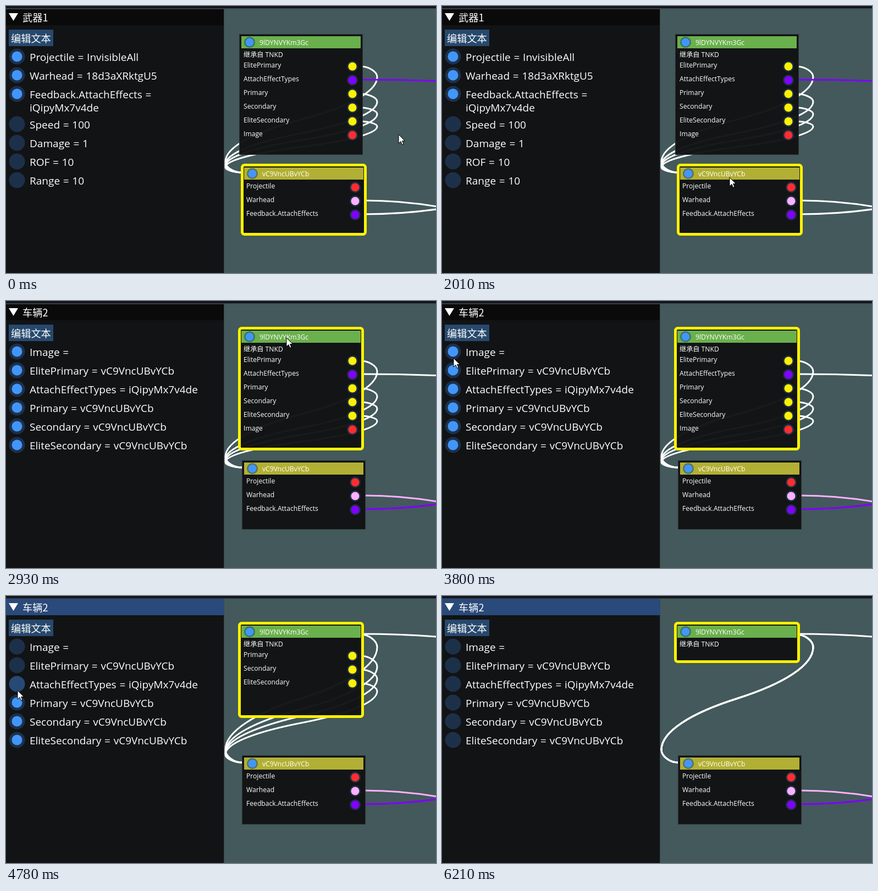
An HTML page with a canvas that plays this animation: 782 by 486 pixels, repeating every 8.86 s.

```html
<!DOCTYPE html>
<html lang="zh">
<head>
<meta charset="utf-8">
<style>
html, body { margin: 0; width: 100%; height: 100%; overflow: hidden; background: #43595b; }
canvas { display: block; }
</style>
</head>
<body>
<canvas id="stage" width="782" height="486"></canvas>
<script>
const ctx = document.getElementById('stage').getContext('2d');
const LOOP = 8860;
const LATIN = '"Open Sans", "Noto Sans CJK SC", "Noto Sans CJK", sans-serif';
const CJK = '"Noto Sans CJK SC", "Noto Sans CJK", "Open Sans", sans-serif';
const SMALL = '12.15px ' + LATIN, LARGE = '19px ' + LATIN, TITLE = '18.2px ' + CJK;
const YELLOW = '#fff200', PURPLE = '#8000ff', RED = '#ff2d2d', PINK = '#ffb0ff', BLUE = '#4296fa';

const VEHICLE = 'vC9VncUBvYCb', EFFECT = 'iQipyMx7v4de';
const VEHICLE_PINS = {
  ElitePrimary: YELLOW, AttachEffectTypes: PURPLE, Primary: YELLOW,
  Secondary: YELLOW, EliteSecondary: YELLOW, Image: RED
};
const WEAPON_PINS = { Projectile: RED, Warhead: PINK, 'Feedback.AttachEffects': PURPLE };
const VEHICLE_ROWS = {
  Image: '', ElitePrimary: VEHICLE, AttachEffectTypes: EFFECT,
  Primary: VEHICLE, Secondary: VEHICLE, EliteSecondary: VEHICLE
};
const WEAPON_ROWS = {
  Projectile: 'InvisibleAll', Warhead: '18d3aXRktgU5', 'Feedback.AttachEffects': '\n' + EFFECT,
  Speed: '100', Damage: '1', ROF: '10', Range: '10'
};

// The vehicle's panel rows are switched off one after another.
const VEHICLE_KEYS = Object.keys(VEHICLE_ROWS);
const ROW_STEP = 34, RESIZE_LAG = 60;
const clickAt = i => 3990 + 380 * i;
const offAt = key => clickAt(VEHICLE_KEYS.indexOf(key));

const move = (from, to, x, y, bend = 0) => ({ from, to, x, y, bend });
const MOVES = [
  move(250, 770, 548, 64),
  move(1290, 1740, 523, 312, -40),
  move(2070, 2630, 510, 67),
  move(2990, 3680, 21, 104),
  ...VEHICLE_KEYS.slice(1).map((_, i) =>
    move(clickAt(i) + 100, clickAt(i) + 230, 21, 104 + ROW_STEP * (i + 1))),
  move(5990, 6190, 345, 450)
];

function pointerAt(t) {
  let x = 714, y = 234;
  for (const m of MOVES) {
    const u = Math.min(1, Math.max(0, (t - m.from) / (m.to - m.from)));
    const eased = u * u * (3 - 2 * u);
    x += (m.x - x) * eased + m.bend * Math.sin(Math.PI * u);
    y += (m.y - y) * eased;
  }
  return [x, y];
}

function rect(x, y, w, h, color) {
  ctx.fillStyle = color;
  ctx.fillRect(x, y, w, h);
}

function dot(x, y, r, color) {
  ctx.fillStyle = color;
  ctx.beginPath();
  ctx.arc(x, y, r, 0, Math.PI * 2);
  ctx.fill();
}

function text(str, x, y, font) {
  ctx.font = font;
  ctx.wordSpacing = font === LARGE ? '0.8px' : '0px';
  ctx.fillStyle = '#fff';
  ctx.fillText(str, x, y);
}

// Chained cubic curves through a flat list of [x, y] points.
function wire(color, points) {
  ctx.strokeStyle = color;
  ctx.lineWidth = 3;
  ctx.beginPath();
  ctx.moveTo(...points[0]);
  for (let i = 1; i < points.length; i += 3) ctx.bezierCurveTo(...points.slice(i, i + 3).flat());
  ctx.stroke();
}

// Half of the S from the vehicle's right side; the other half is its mirror.
const HALF = [[645, 0], [660, 0], [675, .05], [675, .1], [675, .24], [622, .385], [537, .5]];
const LOOP_SHAPE = [...HALF, ...HALF.slice(0, -1).reverse().map(([x, f]) => [1074 - x, 1 - f])];

function loopWire(y) {
  wire('#fff', LOOP_SHAPE.map(([x, f]) => [x, y + f * (303 - y)]));
}

function exitWire(color, x, y, drop) {
  const w = 783 - x;
  wire(color, [[x, y], [x + w * .4, y], [x + w * .73, y + drop * .45], [783, y + drop]]);
}

function node(x, y, h, title, color, selected) {
  rect(x, y, 223, h, 'rgba(17,18,19,.965)');
  ctx.lineWidth = 1;
  ctx.strokeStyle = '#2f3336';
  ctx.strokeRect(x - .5, y + .5, 224, h);
  rect(x + 3, y + 4, 217, 22, color);
  dot(x + 18, y + 15, 10, 'rgba(32,72,112,.6)');
  dot(x + 18, y + 15, 7.5, BLUE);
  text(title, x + 36, y + 20, SMALL);
  if (!selected) return;
  ctx.strokeStyle = YELLOW;
  ctx.lineWidth = 5;
  ctx.beginPath();
  ctx.roundRect(x - .5, y - .5, 224, h + 1, 4);
  ctx.stroke();
}

function pin(x, y, label, color) {
  text(label, x, y + 2, SMALL);
  dot(x + 198, y, 10, '#1d3048');
  dot(x + 198, y, 7.5, color);
}

function panel(title, rows, isOn, focused, px, py) {
  rect(0, 4, 397, 482, '#121315');
  rect(0, 4, 397, 2, '#3c3c46');
  rect(396, 4, 1, 482, '#3c4247');
  if (focused) rect(0, 5, 397, 30, '#294a7a');
  else rect(0, 6, 396, 29, '#0a0a0a');
  ctx.fillStyle = '#fff';
  ctx.fill(new Path2D('M5 13h17l-8.5 14z'));
  text(title, 30, 28, TITLE);
  rect(5, 43, 81, 30, '#27496d');
  text('编辑文本', 9, 66, TITLE);

  let y = 92;
  for (const [key, value] of Object.entries(rows)) {
    const lines = (key + ' = ' + value).split('\n');
    const hovered = focused && Math.hypot(px - 20, py - y) < 15;
    dot(20, y, 14.5, hovered ? '#264a75' : '#1d304a');
    if (isOn(key)) dot(20, y, 9.5, BLUE);
    lines.forEach((line, i) => text(line, 43, y + 8 + 24 * i, LARGE));
    y += ROW_STEP + 21 * (lines.length - 1);
  }
}

function pointer(x, y) {
  const arrow = new Path2D('M0 0V16L4 12.5L6.3 18.3L9 17.2L6.6 11.5H11.5Z');
  ctx.save();
  ctx.translate(x, y);
  ctx.fillStyle = '#fff';
  ctx.fill(arrow);
  ctx.strokeStyle = '#000';
  ctx.lineWidth = 1;
  ctx.stroke(arrow);
  ctx.restore();
}

function draw(t) {
  const vehicle = (t >= 1050 && t < 1960) || t >= 2820;
  const isOn = key => t < offAt(key);
  const top = t < 2880 ? 51 : 50;
  const pins = Object.keys(VEHICLE_PINS).filter(isOn);
  const rowY = i => top + 59 + 25 * i;
  const startY = key => isOn(key) ? rowY(pins.indexOf(key)) : top + 20;
  const sized = VEHICLE_KEYS.filter(key => t < offAt(key) + RESIZE_LAG).length;
  const [px, py] = pointerAt(t);

  rect(0, 0, 782, 486, '#43595b');
  rect(0, 0, 782, 4, '#15161a');
  rect(397, 4, 385, 1, '#33434a');

  VEHICLE_KEYS.filter(key => VEHICLE_ROWS[key] === VEHICLE).forEach(key => loopWire(startY(key)));
  exitWire(vehicle ? '#fff' : PURPLE, 646, startY('AttachEffectTypes') - 1, isOn('AttachEffectTypes') ? 2.5 : 5);
  exitWire(vehicle ? PINK : '#fff', 651, 354, 11);
  exitWire(vehicle ? PURPLE : '#fff', 651, 379, -9);

  node(425, top, 69 + 25 * sized, '9lDYNVYKm3Gc', '#6ab04c', vehicle);
  text('继承自 TNKD', 432, top + 42, SMALL);
  pins.forEach((key, i) => pin(432, rowY(i), key, VEHICLE_PINS[key]));

  node(430, 290, 125, VEHICLE, '#b2b034', !vehicle);
  Object.entries(WEAPON_PINS).forEach(([key, color], i) => pin(437, 330 + 25 * i, key, color));

  if (vehicle) panel('车辆2', VEHICLE_ROWS, isOn, t >= clickAt(0), px, py);
  else panel('武器1', WEAPON_ROWS, key => key in WEAPON_PINS, false, px, py);
  if (t < 6210) pointer(px, py);
}

const start = performance.now();
function tick() {
  draw((performance.now() - start) % LOOP);
  requestAnimationFrame(tick);
}
tick();
</script>
</body>
</html>
```
